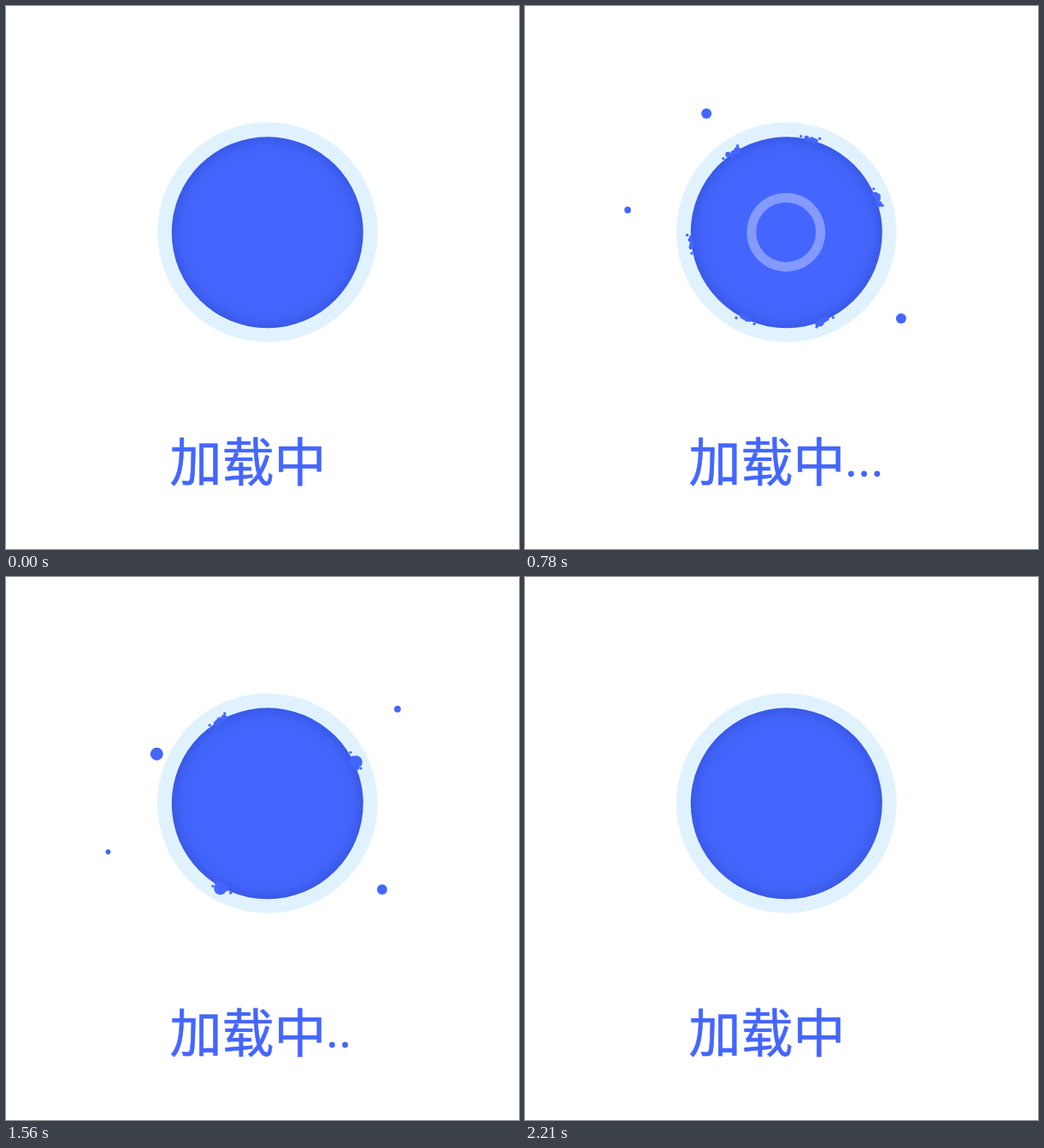
Animation of 600x636 px, one loop 2340 ms. Source, as an HTML page:

```html
<!DOCTYPE html>
<html lang="zh-CN">
<head>
<meta charset="utf-8">
<title>加载中</title>
<style>
  html, body { margin: 0; width: 100%; height: 100%; overflow: hidden; background: #fff; }
  svg { display: block; }
  text {
    font: 400 61px "Noto Sans CJK SC", "Noto Sans CJK", sans-serif;
    stroke: #4466ff; stroke-width: .6; stroke-linejoin: round;
  }
</style>
</head>
<body>
<svg width="600" height="636" viewBox="0 0 600 636" fill="#4466ff">
  <defs>
    <radialGradient id="shade">
      <stop offset=".74" stop-color="#4466ff"/>
      <stop offset=".9" stop-color="#4163f8"/>
      <stop offset="1" stop-color="#3959e7"/>
    </radialGradient>
  </defs>
  <circle cx="305.8" cy="265" r="128.8" fill="#e1f2ff"/>
  <circle cx="305.8" cy="265.3" r="112" fill="url(#shade)"/>
  <circle id="ring" cx="305.3" cy="265" fill="none" stroke="#fff"/>
  <g id="drops"></g>
  <text x="191.5" y="556.7">加载中</text>
  <g id="dots"></g>
</svg>
<script>
const STEP = 130, STEPS = 18, CX = 306, CY = 265, EDGE = 114;
const $ = id => document.getElementById(id);

// step and angle at which each drop reaches the rim
const drops = [
  [4.5, 236], [4.9, -75], [5, -20], [4.5, 174], [5.7, 116], [5, 68],
  [8, 216], [8, 17], [8.8, 160], [10, -61], [10, 64], [11, 240],
  [12, -25], [12, 119], [13, 194], [14, 17], [14.8, -64], [15.1, 132]
];
const ripples = [5, 9, 14];

const noise = n => { const v = Math.sin(n * 12.9898) * 43758.5453; return v - Math.floor(v); };
const circle = (x, y, r) => `<circle cx="${x.toFixed(1)}" cy="${y.toFixed(1)}" r="${r.toFixed(2)}"/>`;

// out: distance from the centre, along: offset following the rim
function polar(angle, out, along, r) {
  const a = angle * Math.PI / 180, c = Math.cos(a), s = Math.sin(a);
  return circle(CX + out * c - along * s, CY + out * s + along * c, r);
}

function splash(angle, seed) {
  const rnd = i => noise(seed * 17 + i + 1);
  let out = "";
  for (let i = -2; i <= 2; i++) {
    out += polar(angle, 110 + 4 * rnd(i + 2), i * 3, 2 + 2 * rnd(i + 7));
  }
  return out + polar(angle, 116, 9, 1.7) + polar(angle, 113, -13, 1.6);
}

// drops spiral inwards, growing until they hit the rim and burst
function drop([land, angle], seed, k) {
  const left = land - k;
  if (left > 3.2 || left < -1.6) return "";
  if (left < 0) return splash(angle, seed);
  const grown = 7.5 - 1.5 * Math.max(0, left - 1) ** 1.5;
  const r = grown * (land < 6 ? 1.27 : 1);
  const dot = polar(angle + 10 * left, EDGE + 28 * left ** .94, 0, r);
  return left ? dot : dot + splash(angle, seed);
}

function draw(k) {
  $("drops").innerHTML = drops.map((d, i) => drop(d, i, k)).join("");

  const start = ripples.find(s => k >= s && k < s + 3);
  const ring = $("ring");
  ring.style.display = start ? "" : "none";
  if (start) {
    const age = k - start;
    ring.setAttribute("r", 13.4 + 27 * age);
    ring.setAttribute("stroke-width", 8.8 + 2.2 * age);
    ring.setAttribute("stroke-opacity", .45 - .11 * age);
  }

  const count = Math.floor(k % 8 / 2);
  $("dots").innerHTML = Array.from({ length: count }, (_, i) => circle(381.4 + 15.2 * i, 548, 3.4)).join("");
}

let shown = -1;
const origin = performance.now();
function tick() {
  const k = Math.floor((performance.now() - origin) / STEP) % STEPS;
  if (k !== shown) draw(shown = k);
  requestAnimationFrame(tick);
}
tick();
</script>
</body>
</html>
```
